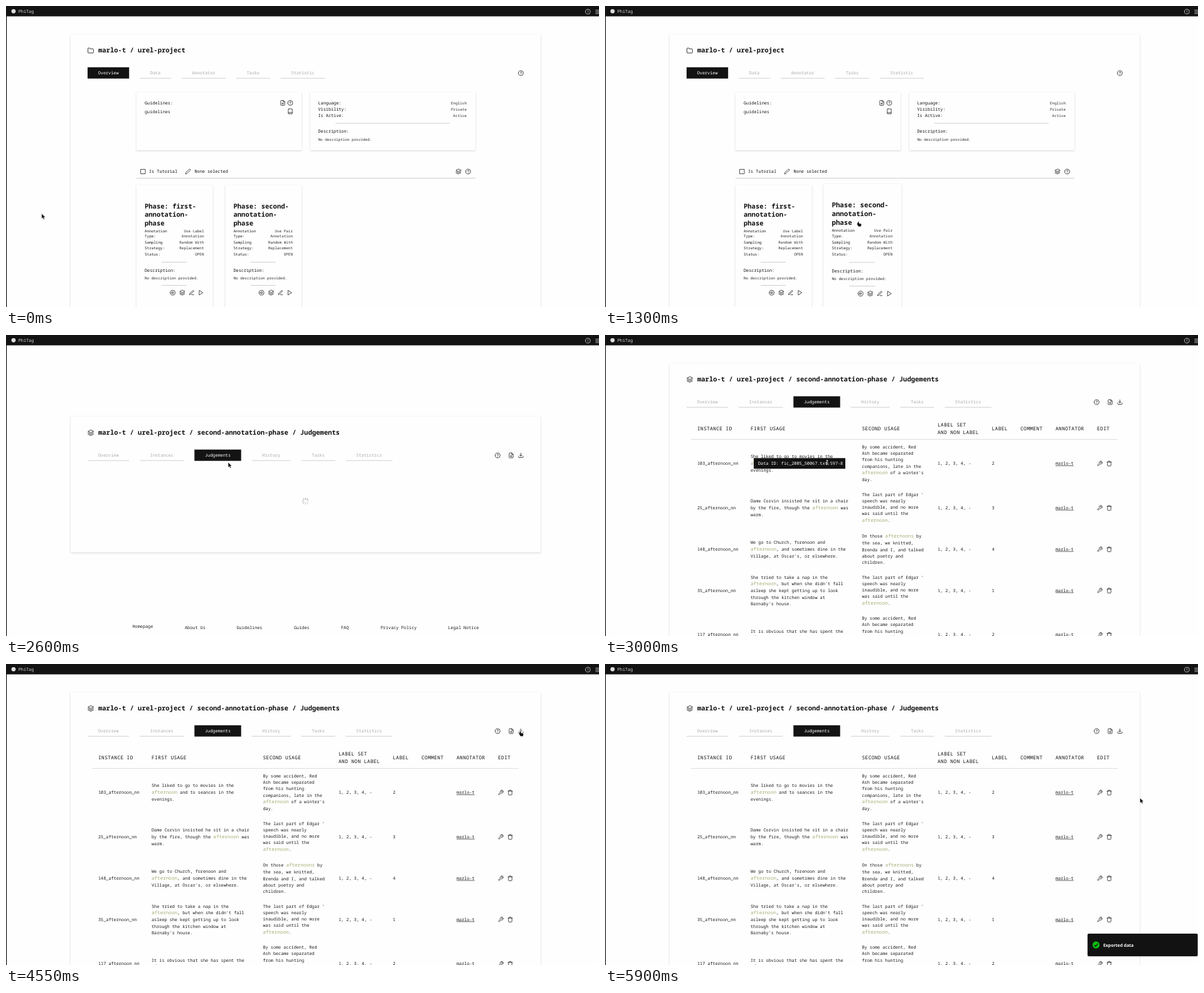
Write an HTML page that moves like this. It is 945 px wide and 480 px high and loops after 6.8 s.

```html
<!DOCTYPE html>
<html lang="en">
<head>
<meta charset="utf-8">
<title>Annotation walkthrough</title>
<style>
html, body { margin: 0; width: 100%; height: 100%; overflow: hidden; background: #fefefe; }
svg { display: block; }
text { font: 6.83px "Noto Sans Mono", "DejaVu Sans Mono", monospace; fill: #1c1c1c; text-rendering: geometricPrecision; }
.title { font-size: 10.52px; font-weight: 600; fill: #111; }
.mid { font-weight: 500; fill: #111; }
.small { font-size: 5.95px; fill: #2c2c2c; }
.key { font-size: 5.95px; font-weight: 500; }
.th { font-size: 7.8px; font-weight: 500; letter-spacing: .05em; fill: #111; }
.tab { fill: #a9a9a9; }
.on { fill: #fff; }
.bar { fill: #ddd; }
.hit { font-size: 7.6px; fill: #a5ad72; }
.link { text-decoration: underline; }
.toast { font: 700 6.9px "Open Sans", "Noto Sans", sans-serif; fill: #fff; }
.end { text-anchor: end; }
.center { text-anchor: middle; }
.card { fill: #fefefe; filter: drop-shadow(0 1.5px 1.5px rgba(0, 0, 0, .16)); }
.icon { fill: none; stroke: #1a1a1a; stroke-width: 2; stroke-linecap: round; stroke-linejoin: round; }
.light { stroke: #ddd; }
</style>
</head>
<body>
<svg id="stage" width="945" height="480" viewBox="0 0 945 480"></svg>
<script>
const USER = 'marlo-t';
const DARK = '#131313';
const RING = 'M2 12a10 10 0 1 0 20 0a10 10 0 1 0-20 0';
const ICONS = {
  help: RING + 'M9.1 9a3 3 0 0 1 5.8 1c0 2-3 3-3 3M12 17h.01',
  info: RING + 'M12 7v5M12 16h.01',
  stop: RING + 'M9 9h6v6H9z',
  menu: 'M3 6h18M3 12h18M3 18h18',
  folder: 'M22 19a2 2 0 0 1-2 2H4a2 2 0 0 1-2-2V5a2 2 0 0 1 2-2h5l2 3h9a2 2 0 0 1 2 2z',
  layers: 'M12 2 2 7l10 5 10-5zM2 17l10 5 10-5M2 12l10 5 10-5',
  file: 'M14 2H6a2 2 0 0 0-2 2v16a2 2 0 0 0 2 2h12a2 2 0 0 0 2-2V8zM14 2v6h6M12 18v-6M9 15h6',
  book: 'M4 19.5A2.5 2.5 0 0 1 6.5 17H20M6.5 2H20v20H6.5A2.5 2.5 0 0 1 4 19.5v-15A2.5 2.5 0 0 1 6.5 2z',
  pencil: 'M17 3a2.83 2.83 0 1 1 4 4L7.5 20.5 2 22l1.5-5.5z',
  edit: 'M12 20h9M16.5 3.5a2.12 2.12 0 0 1 3 3L7 19l-4 1 1-4z',
  play: 'M5 3l14 9-14 9z',
  box: 'M3 3h18v18H3z',
  download: 'M21 15v4a2 2 0 0 1-2 2H5a2 2 0 0 1-2-2v-4M7 10l5 5 5-5M12 15V3',
  tool: 'M14.7 6.3a1 1 0 0 0 0 1.4l1.6 1.6a1 1 0 0 0 1.4 0l3.77-3.77a6 6 0 0 1-7.94 7.94l-6.91 6.91a2.12 2.12 0 0 1-3-3l6.91-6.91a6 6 0 0 1 7.94-7.94z',
  trash: 'M3 6h18M19 6v14a2 2 0 0 1-2 2H7a2 2 0 0 1-2-2V6m3 0V4a2 2 0 0 1 2-2h4a2 2 0 0 1 2 2v2'
};

const text = (x, y, s, cls = '') => `<text x="${x}" y="${y}" class="${cls}">${s}</text>`;
const rect = (x, y, w, h, fill) => `<rect x="${x}" y="${y}" width="${w}" height="${h}" fill="${fill}"/>`;
const card = (x, y, w, h) => `<rect class="card" x="${x}" y="${y}" width="${w}" height="${h}"/>`;
const rule = (x1, x2, y, color = '#cfcfcf') => rect(x1, y - .5, x2 - x1, 1, color);
const group = (id, body, shift = 0) => `<g id="${id}" transform="translate(0 ${shift})">${body}</g>`;
const icon = (name, x, y, size = 9.4, cls = '') =>
  `<path class="icon ${cls}" d="${ICONS[name]}" transform="translate(${x} ${y}) scale(${size / 24}) translate(-12 -12)"/>`;

function tabs(names, active) {
  let x = 130, out = '';
  for (const name of names) {
    const w = name.length * 4.1 + 33.4, on = name === active;
    out += on ? rect(x, 97.7, w, 18, DARK) : rule(x, x + w, 115.2);
    out += text(x + w / 2, 108.8, name, 'center tab' + (on ? ' on' : ''));
    x += w + 16.9;
  }
  return out;
}

const head = (mark, path, names, active) =>
  icon(mark, 135, 71, 10.5) + text(147, 74.3, path, 'title') + tabs(names, active);

function phaseCard(x, name, type) {
  const left = x + 13, right = x + 107.5;
  const lines = ['Phase: ' + name + '-', 'annotation-', 'phase'];
  const facts = [[360.6, 'Annotation', type], [369, 'Type:', 'Annotation'], [379.2, 'Sampling', 'Random With'],
    [387.8, 'Strategy:', 'Replacement'], [398, 'Status:', 'OPEN']];
  return card(x, 286, 121.5, 210) +
    lines.map((s, i) => text(left, 322.6 + i * 13.5, s, 'title')).join('') +
    facts.map(([y, k, v]) => text(left, y, k, 'key') + text(right, y, v, 'small end')).join('') +
    rule(x + 40, x + 80, 408.5) + text(left, 423.8, 'Description:', 'mid') +
    text(left, 436.3, 'No description provided.', 'small') + rule(x + 40, x + 80, 445.5) +
    ['stop', 'layers', 'edit', 'play'].map((n, i) => icon(n, x + 57.7 + i * 15.1, 457.2)).join('');
}

function projectPage() {
  const facts = [['Language:', 'English'], ['Visibility:', 'Private'], ['Is Active:', 'Active']];
  return card(103, 45, 749, 460) +
    head('folder', USER + ' / urel-project', ['Overview', 'Data', 'Annotator', 'Tasks', 'Statistic'], 'Overview') +
    icon('help', 820.5, 107) +
    card(208, 138, 263, 92) + text(221, 157, 'Guidelines:', 'mid') + text(221, 170.6, 'guidelines') +
    icon('file', 441, 154.5) + icon('help', 453, 154.5) + icon('book', 453, 168) +
    card(485, 138, 263, 92) +
    facts.map(([k, v], i) => text(497.5, 157 + i * 10.2, k, 'mid') + text(734, 157 + i * 10.2, v, 'small end')).join('') +
    rule(525, 707, 187) + text(497.5, 202, 'Description:', 'mid') +
    text(497.5, 214.5, 'No description provided.', 'small') +
    icon('box', 218.5, 264) + text(228, 266.2, 'Is Tutorial', 'mid') +
    icon('pencil', 290, 264) + text(300.5, 266.2, 'None selected', 'mid') +
    icon('layers', 721, 264) + icon('help', 736.5, 264) + rule(208, 748, 274.5) +
    phaseCard(208, 'first', 'Use Label') + group('hovered', phaseCard(349.5, 'second', 'Use Pair'));
}

const phasePath = USER + ' / urel-project / second-annotation-phase';
const phaseTabs = ['Overview', 'Instances', 'Judgements', 'History', 'Tasks', 'Statistics'];
const judgeHead = head('layers', phasePath + ' / Judgements', phaseTabs, 'Judgements') +
  icon('help', 783.5, 107) + icon('file', 805, 107) + icon('download', 820.5, 107);

const links = [[285, 'About Us'], [367.5, 'Guidelines'], [459, 'Guides'], [534, 'FAQ'],
  [597, 'Privacy Policy'], [704.5, 'Legal Notice']];
const shortPage = card(103, 130, 749, 216.5) + text(201.5, 467.2, 'Homepage') +
  links.map(([x, s]) => text(x, 469.2, s)).join('');

const spokes = Array.from({ length: 8 }, (_, i) =>
  `<path d="M0-2.7V-5.6" stroke="#777" stroke-width="1.1" opacity="${.3 + i * .08}" transform="rotate(${i * 45})"/>`).join('');

// Lines with a marked word are a little taller; the block is centred on the row.
function cell(x, middle, copy) {
  const lines = copy.split('|');
  const heights = lines.map(s => s.includes('*') ? 11.6 : 10.2);
  let y = middle - heights.reduce((a, b) => a + b) / 2;
  return lines.map((s, i) => {
    const base = y + heights[i] / 2 + 2.1;
    y += heights[i];
    return text(x, base, s.replace(/\*(\w+)\*/, '<tspan class="hit">$1</tspan>'));
  }).join('');
}

const huntText = "By some accident, Red|Ash became separated|from his hunting|companions, late in the|*afternoon* of a winter's|day.";
const speechText = "The last part of Edgar '|speech was nearly|inaudible, and no more|was said until the|*afternoon*.";
const rows = [
  [205, 103, 'She liked to go to movies in the|*afternoon* and to seances in the|evenings.', huntText, 2],
  [275.7, 25, 'Dame Corvin insisted he sit in a chair|by the fire, though the *afternoon* was|warm.', speechText, 3],
  [341.7, 148, "We go to Church, forenoon and|*afternoon*, and sometimes dine in the|Village, at Oscar's, or elsewhere.",
    'On those *afternoons* by|the sea, we knitted,|Brenda and I, and talked|about poetry and|children.', 4],
  [407.5, 35, "She tried to take a nap in the|*afternoon*, but when she didn't fall|asleep she kept getting up to look|through the kitchen window at|Barnaby's house.", speechText, 1],
  [478.2, 117, 'It is obvious that she has spent the|*afternoon* in the garden.', huntText, 2]
];
const columns = [[147, 'INSTANCE ID'], [232, 'FIRST USAGE'], [409.5, 'SECOND USAGE'], [616.5, 'LABEL'],
  [662, 'COMMENT'], [718, 'ANNOTATOR'], [784, 'EDIT']];

const tablePage = card(103, 45, 749, 460) + judgeHead +
  columns.map(([x, s]) => text(x, 152.3, s, 'th')).join('') +
  text(530, 146.3, 'LABEL SET', 'th') + text(530, 158.3, 'AND NON LABEL', 'th') + rule(137, 817, 166.5, '#dedede') +
  rows.map(([y, id, first, second, label]) =>
    text(147, y + 2.1, id + '_afternoon_nn') + cell(232, y, first) + cell(409.5, y, second) +
    text(530, y + 2.1, '1, 2, 3, 4, -') + text(616.5, y + 2.1, label) +
    text(718, y + 2.1, USER, 'link') + icon('tool', 788.5, y) + icon('trash', 803.5, y)).join('') +
  group('smear', rect(801.5, 106.8, 13, 2, DARK)) +
  group('tip', rect(237, 196.3, 146, 17, DARK) + text(244, 207.1, 'Data ID: fic_2005_50067.txt:597-8', 'on'));

const stage = document.getElementById('stage');
stage.innerHTML =
  group('project', projectPage()) +
  group('phase', shortPage + group('', head('layers', phasePath, phaseTabs, 'Overview') + icon('help', 820.5, 107), 85) +
    group('underline', rule(300.5, 374.5, 201, DARK))) +
  group('loading', shortPage + group('', judgeHead, 85) + `<g id="spinner">${spokes}</g>`) +
  group('table', tablePage) +
  rect(0, 0, 945, 16.5, DARK) + rect(0, 0, 1.2, 480, DARK) +
  '<circle cx="12" cy="8.3" r="3.4" fill="#ddd"/>' + text(19.7, 11.2, 'PhiTag', 'bar') +
  icon('info', 927.3, 9, 9.4, 'light') + icon('menu', 943.7, 9.3, 10.5, 'light') +
  group('toast', '<rect class="card" x="769" y="430" width="175.5" height="36" rx="2" style="fill:#121212"/>' +
    '<circle cx="782.5" cy="448" r="5.7" fill="#07bc0c"/><path d="M779.8 448.2l2 2 3.6-4.2" fill="none" stroke="#121212" stroke-width="1.3"/>' +
    text(794, 450.7, 'Exported data', 'toast')) +
  `<g id="pointer">
    <path id="arrow" d="M0 0V8.3L1.9 6.6 3.2 9.4 4.7 8.7 3.4 6H6Z" fill="#111" stroke="#fff" stroke-width=".5"/>
    <path id="hand" d="M-.8 .2Q0-.6 .8 .2V3L4 3.7Q4.8 4 4.6 5L4 8.3H-.2L-2.4 4.8Q-2-.4 4-.8 4.6Z" fill="#111" stroke="#fff" stroke-width=".4"/>
    <path id="beam" d="M-1.5-3H1.5M0-3V3M-1.5 3H1.5" stroke="#fff" stroke-width=".9"/>
  </g>`;

const $ = id => document.getElementById(id);
const show = (id, on) => { $(id).style.display = on ? '' : 'none'; };
const within = (t, a, b) => t >= a && t < b;
const part = (t, a, b) => Math.min(1, Math.max(0, (t - a) / (b - a)));
const smooth = p => p * p * (3 - 2 * p);
const easeOut = p => 1 - (1 - p) ** 3;

// start, end, x, y, height of the arc
const moves = [[400, 1050, 404, 343.5, -82], [1450, 2100, 354, 203, 0], [3200, 3850, 826, 134, 88],
  [3900, 4050, 826, 116, 0], [4050, 4550, 820, 107, 0], [4800, 5100, 840, 108, 0],
  [5100, 5450, 856, 163, 0], [5500, 5900, 852.5, 213.5, 0]];

function pointerAt(t) {
  let x = 56.8, y = 331;
  for (const [a, b, tx, ty, arc] of moves) {
    const p = smooth(part(t, a, b));
    x += (tx - x) * p;
    y += (ty - y) * p + arc * 4 * p * (1 - p);
  }
  return [x, y];
}

function toastShift(t) {
  const keys = [[0, 1575], [.6, -13], [.75, 5], [.9, -2.6], [1, 0]];
  const p = part(t, 4660, 5360);
  let shift = keys[0][1];
  for (let i = 1; i < keys.length; i++)
    shift += (keys[i][1] - shift) * easeOut(part(p, keys[i - 1][0], keys[i][0]));
  return shift;
}

function render(t) {
  show('project', t < 1500);
  show('phase', within(t, 1500, 2500));
  show('loading', within(t, 2500, 2700));
  show('table', t >= 2700);
  show('tip', within(t, 2750, 3300));
  show('smear', within(t, 4950, 5450));
  show('toast', t >= 4660);

  const zoom = 1 + .022 * easeOut(part(t, 930, 1300));
  $('hovered').setAttribute('transform', `translate(410 391) scale(${zoom}) translate(-410 -391)`);
  $('underline').setAttribute('opacity', part(t, 2100, 2300));
  $('spinner').setAttribute('transform', `translate(477.3 265) rotate(${Math.floor(t / 100) * 45})`);
  $('toast').setAttribute('transform', `translate(${toastShift(t)} 0)`);

  const hand = within(t, 930, 1500) || within(t, 2150, 2500) || within(t, 4400, 4900);
  const beam = within(t, 2750, 3250);
  show('hand', hand);
  show('beam', beam);
  show('arrow', !hand && !beam);
  $('pointer').setAttribute('transform', `translate(${pointerAt(t)})`);
}

const start = performance.now();
function tick() {
  render((performance.now() - start) % 6800);
  requestAnimationFrame(tick);
}
tick();
</script>
</body>
</html>
```
